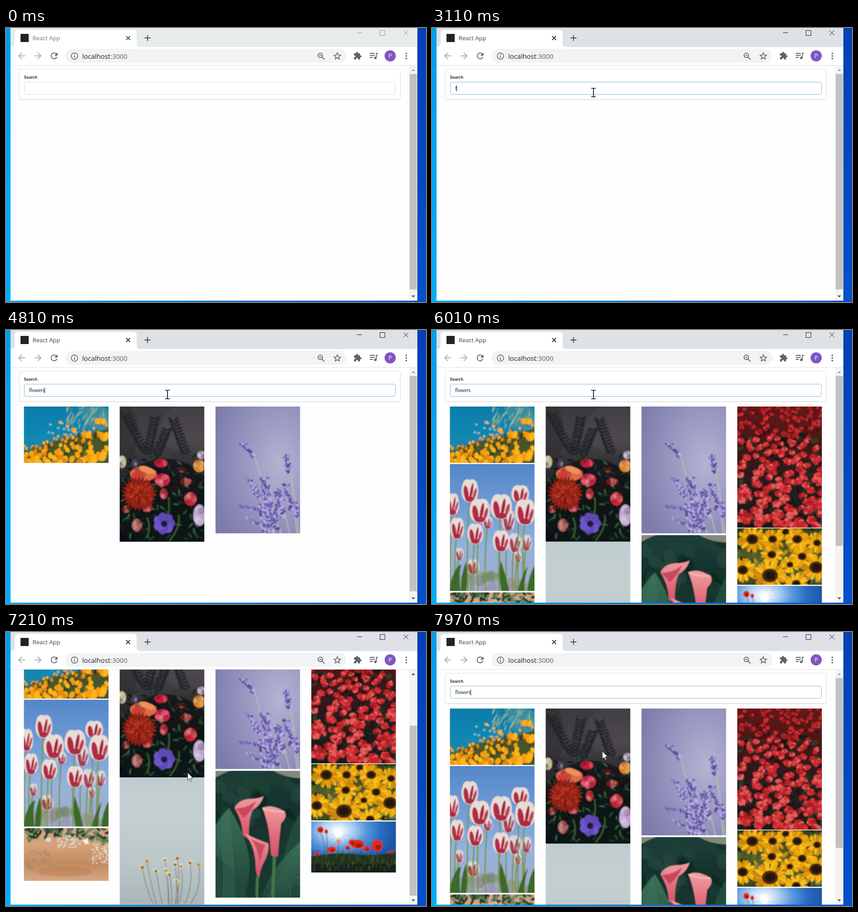
Write an HTML page that moves like this. It is 926x605 px and loops after 8 s.

```html
<!DOCTYPE html>
<html lang="en">
<head>
<meta charset="utf-8">
<title>React App</title>
<style>
html, body { margin: 0; width: 100%; height: 100%; overflow: hidden; background: #fff; }
svg { display: block; }
.ui { font-family: "Open Sans", "Noto Sans", sans-serif; }
.page { font-family: Lato, sans-serif; }
.line { fill: none; stroke: #5f6368; stroke-width: 1.8; }
</style>
</head>
<body>
<svg id="stage" width="926" height="605" viewBox="0 0 926 605" xmlns="http://www.w3.org/2000/svg">
<defs>
  <clipPath id="view"><rect x="10" y="83" width="879" height="519"/></clipPath>
  <filter id="soft"><feGaussianBlur stdDeviation=".8"/></filter>
  <linearGradient id="left" x2="0" y2="1"><stop stop-color="#009dec"/><stop offset="1" stop-color="#00aef8"/></linearGradient>
  <linearGradient id="right" x2="0" y2="1"><stop stop-color="#0440b4"/><stop offset="1" stop-color="#0650cc"/></linearGradient>
  <linearGradient id="foot"><stop stop-color="#00a3ee"/><stop offset=".5" stop-color="#0a78cd"/><stop offset="1" stop-color="#0650c8"/></linearGradient>
</defs>
<rect width="926" height="605" fill="url(#foot)"/>
<rect width="10" height="605" fill="url(#left)"/>
<rect x="907" width="19" height="605" fill="url(#right)"/>
<rect x="907" width="1" height="603" fill="#03379b"/>
<rect x="10" width="897" height="602" fill="#fefefe"/>

<g class="page" clip-path="url(#view)">
  <g id="doc">
    <rect x="29.5" y="92" width="840" height="67" rx="3" fill="#dcddde"/>
    <rect x="29.5" y="91" width="840" height="67" rx="3" fill="#fff" stroke="#dcddde"/>
    <text x="39.5" y="111.7" font-size="9.9" font-weight="700" fill="#222">Search</text>
    <rect id="field" x="40.5" y="119.5" width="818" height="27" rx="3" fill="#fff"/>
    <text id="query" x="51" y="137" font-size="10.5" fill="#222"></text>
    <rect id="caret" y="127" width="1" height="13" fill="#111"/>
    <g id="photos"></g>
  </g>
</g>

<g id="scrollbar">
  <rect x="889" y="83" width="18" height="519" fill="#f3f3f2"/>
  <rect id="thumb" x="890" width="16" fill="#c1c1c1"/>
  <path id="up" d="M894 95L898 90.500L902 95Z"/>
  <path id="down" d="M894 590.500H902L898 595Z" fill="#505050"/>
</g>

<g class="ui">
  <rect id="bar" x="10" width="897" height="42"/>
  <path d="M11 42Q19 42 19 34V12Q19 4 27 4H280Q288 4 288 12V34Q288 42 296 42Z" fill="#fff"/>
  <rect x="32" y="13" width="18" height="18" fill="#20232a"/>
  <text id="tab" x="58.500" y="27" font-size="13">React App</text>
  <path id="closeTab" class="line" d="M265 18L273.500 26.500M273.500 18L265 26.500"/>
  <path class="line" style="stroke:#45494d" d="M305.500 22H318.500M312 15.500V28.500"/>
  <path id="controls" fill="none" d="M774 10.500H785M824.500 5.500H835.500V16.500H824.500ZM876.500 5.500L887 16M887 5.500L876.500 16"/>
  <rect x="10" y="42" width="897" height="40" fill="#fff"/>
  <rect x="10" y="82" width="897" height="1" fill="#dfe0e1"/>
  <g class="line" style="stroke:#acaeb1">
    <path d="M42 61.500H28.500M35 54.500L28 61.500L35 68.500"/>
    <path d="M63 61.500H76.500M70 54.500L77 61.500L70 68.500"/>
  </g>
  <path class="line" d="M111.500 58A6.500 6.500 0 1 0 112.300 63.500"/>
  <path d="M113.500 54V61H106.500Z" fill="#5f6368"/>
  <rect x="131" y="46" width="619" height="31" rx="15.500" fill="#f1f3f4"/>
  <circle class="line" style="stroke-width:1.600" cx="151" cy="62" r="7"/>
  <path class="line" d="M151 61V66M151 57.500V59.300"/>
  <text x="168" y="67.500" font-size="14.8" fill="#202124">localhost<tspan fill="#5f6368">:3000</tspan></text>
  <circle class="line" cx="693" cy="60.300" r="5"/>
  <path class="line" d="M696.500 64L702 69.500M690.500 60.300H695.500"/>
  <path id="star" class="line" style="stroke-width:1.600"/>
  <path transform="translate(765.500 51.800) scale(.8)" fill="#5f6368" d="M20.500 11H19V7c0-1.100-.9-2-2-2h-4V3.500a2.500 2.500 0 0 0-5 0V5H4c-1.100 0-2 .9-2 2v3.800h1.500a2.700 2.700 0 0 1 0 5.400H2V20c0 1.100.9 2 2 2h3.800v-1.500a2.700 2.700 0 0 1 5.400 0V22H17c1.100 0 2-.9 2-2v-4h1.500a2.500 2.500 0 0 0 0-5z"/>
  <path class="line" d="M802 56H813M802 60.500H813M802 65H809M816.500 66V56H820"/>
  <circle cx="814.300" cy="66" r="2.700" fill="#5f6368"/>
  <circle cx="847" cy="61.500" r="12.300" fill="#7e57c2"/>
  <text x="847" y="66" font-size="12.500" fill="#fff" text-anchor="middle">P</text>
  <g fill="#5f6368"><circle cx="882.500" cy="56" r="1.800"/><circle cx="882.500" cy="61.700" r="1.800"/><circle cx="882.500" cy="67.400" r="1.800"/></g>
</g>

<path id="arrow" d="M.5 .5V17L4.300 13.500L7 19.500L9.500 18.400L7 12.500H12.300Z" fill="#fff" stroke="#222" stroke-width=".9"/>
<g id="beam" fill="none">
  <path d="M-5 -9H-2Q0 -9 0 -7Q0 -9 2 -9H5M0 -8V9M-5 10H-2Q0 10 0 8Q0 10 2 10H5" stroke="#fff" stroke-width="3"/>
  <path d="M-5 -9H-2Q0 -9 0 -7Q0 -9 2 -9H5M0 -8V9M-5 10H-2Q0 10 0 8Q0 10 2 10H5" stroke="#111" stroke-width="1.700"/>
</g>
</svg>

<script>
const $ = id => document.getElementById(id);
const set = (id, attrs) => { for (const k in attrs) $(id).setAttribute(k, attrs[k]); };
const show = (id, on) => set(id, { visibility: on ? 'visible' : 'hidden' });

// ---- drawing helpers ----
const W = 186.5;
let seed = 1;
const rnd = (a = 0, b = 1) => {
  seed = (seed * 16807) % 2147483647;
  return a + (b - a) * seed / 2147483647;
};
const pick = list => list[Math.floor(rnd() * list.length)];
const n1 = v => +v.toFixed(1);
const many = (n, fn) => Array.from({ length: n }, (_, i) => fn(i / n)).join('');
const oval = (x, y, rx, ry, fill, turn = 0, op = 1) =>
  `<ellipse rx="${n1(rx)}" ry="${n1(ry)}" fill="${fill}" opacity="${op}" transform="translate(${n1(x)} ${n1(y)}) rotate(${n1(turn)})"/>`;
const shape = (d, fill) => `<path d="${d}" fill="${fill}"/>`;
const stem = (d, color, w) => `<path d="${d}" fill="none" stroke="${color}" stroke-width="${w}"/>`;
const spokes = (x, y, r, inner, n, turn = 0) => 'M' + Array.from({ length: n * 2 }, (_, i) => {
  const a = Math.PI * i / n + turn, q = i % 2 ? inner : r;
  return n1(x + q * Math.sin(a)) + ' ' + n1(y - q * Math.cos(a));
}).join('L') + 'Z';
let grads = 0;
const gradient = (colors, radial = '') => {
  const id = 'g' + grads++, tag = radial ? 'radialGradient' : 'linearGradient';
  const stops = colors.map((c, i) => `<stop offset="${i / (colors.length - 1)}" stop-color="${c}"/>`).join('');
  return [`<${tag} id="${id}" ${radial || 'x2="0" y2="1"'}>${stops}</${tag}>`, `url(#${id})`];
};
const back = (h, colors, radial) => {
  const [def, url] = gradient(colors, radial);
  return `${def}<rect x="-5" y="-5" width="${W + 10}" height="${h + 10}" fill="${url}"/>`;
};

// ---- pictures ----
const meadow = h => {
  const top = x => 88 - x * .3;
  return back(h, ['#0a7ba8', '#1188b3', '#2c7f92']) +
    oval(165, 25, 55, 26, '#5f9ba2', 40, .5) +
    many(45, () => { const x = rnd(95, 190), y = rnd(0, 45); return oval(x, y, 1.3, rnd(5, 13), pick(['#9db77f', '#6f9a78', '#b9c8a8']), rnd(10, 45), .7); }) +
    shape(`M-5 105Q30 86 70 76T192 48V130H-5Z`, '#47562a') +
    many(14, () => oval(rnd(50, 125), rnd(35, 75), 3, 2.5, '#b9d2cf', 0, .7)) +
    many(95, p => {
      const x = rnd(0, W), t = top(x), y = t + (h + 3 - t) * p, r = 3 + p * 6;
      return oval(x + rnd(-9, 9), y + r, 2, r * 1.3, pick(['#39451d', '#2b331a', '#5d6b2f']), rnd(-30, 30)) +
        oval(x, y, r * .75, r, pick(['#f9a511', '#fdb515', '#e48508', '#f39a0c']), rnd(-40, 40));
    }) +
    [[80, 35, 4], [163, 32, 8], [173, 33, 8], [96, 44, 4], [110, 52, 6], [140, 62, 10], [177, 66, 12], [150, 116, 14], [25, 116, 11], [170, 110, 13]]
      .map(([x, y, r]) => oval(x - r * .35, y, r * .55, r * .85, '#f59d0b', -15) + oval(x + r * .35, y, r * .55, r * .85, '#fdb51a', 15)).join('');
};

const tulips = h => {
  const egg = (x, y, rx, ry) => `M${x - rx * .75} ${y - ry * .8}C${x - rx * 1.3} ${y} ${x - rx} ${y + ry} ${x} ${y + ry}S${x + rx * 1.3} ${y} ${x + rx * .75} ${y - ry * .8}Q${x + rx * .3} ${y - ry * 1.1} ${x} ${y - ry * .9}Q${x - rx * .4} ${y - ry * 1.1} ${x - rx * .75} ${y - ry * .8}Z`;
  const cup = ([x, y, rx, ry]) => shape(egg(x, y, rx, ry), '#e8dcd7') +
    oval(x - rx * .45, y + ry * .2, rx * .3, ry * .65, '#b22a45', -8) + oval(x + rx * .2, y + ry * .05, rx * .17, ry * .7, '#a8203b', 10) +
    oval(x + rx * .6, y + ry * .25, rx * .18, ry * .5, '#be4158', 16) + oval(x, y + ry * .72, rx * .55, ry * .24, '#ad2b44');
  const far = [[21, 199, 9, 14], [51, 227, 14, 17], [143, 174, 14, 22], [169, 174, 11, 18], [83, 129, 11, 14], [129, 124, 14, 24], [150, 205, 8, 13]];
  const near = [[44, 59, 18, 26], [155, 66, 19, 20], [166, 106, 22, 29], [6, 89, 14, 25], [16, 142, 15, 24], [66, 103, 22, 27], [113, 94, 23, 28], [56, 154, 17, 23], [113, 170, 18, 24]];
  const stalk = ([x, y]) => stem(`M${x} ${y}Q${x - 8} ${(y + h) / 2} ${x - 4} ${h + 3}`, '#7c963f', 3);
  return back(h, ['#5286c8', '#6f9bd5', '#94b3dd', '#a4a9c8']) +
    many(24, () => oval(rnd(0, W), rnd(245, 285), 10, 12, pick(['#8a9673', '#a58bab', '#6e8560', '#9a98b4']), 0, .6)) +
    far.map(stalk).join('') + `<g opacity=".85">${far.map(cup).join('')}</g>` + near.map(stalk).join('') +
    shape('M-3 285Q8 225 25 222Q18 250 24 285ZM24 285Q24 240 36 215Q40 250 36 285ZM114 285Q106 240 112 212Q124 250 132 285ZM148 285Q160 240 172 225Q162 260 164 285ZM170 285Q174 240 190 220V285Z', '#3b6a2a') +
    near.map(cup).join('');
};

const wood = h => back(h, ['#d0a684', '#d6a27a', '#c48a61', '#d8ab8a']) +
  [26, 58, 90].map(y => stem(`M0 ${y}H187`, '#b98d6a', .8)).join('') + oval(90, 96, 60, 11, '#b5703f', 0, .35) +
  many(90, () => { const x = rnd(0, W); return oval(x, rnd(0, 16 + 16 * Math.abs(x - 70) / 100), 7, 3, pick(['#2c4630', '#496a49', '#1f3827', '#6d8a64']), rnd(0, 180)); }) +
  many(22, () => oval(rnd(8, 62), rnd(48, 94), 6, 1.5, '#8f8d66', rnd(20, 80), .7)) +
  many(75, () => oval(rnd(148, 186), rnd(35, 78), 1.8, 1.5, pick(['#e9e4d5', '#cfcdb4']))) +
  many(50, () => oval(rnd(72, 125), rnd(16, 44), 1.8, 1.5, '#dfe3da')) +
  oval(54, 26, 6, 5, '#cfdcd9') + oval(136, 30, 8, 3, '#f1f1ea', 30) + oval(138, 29, 3, 7, '#f1f1ea', 20);

const bouquet = h => {
  const sprig = (x, y, dx, dy) => stem(`M${x} ${y}l${dx} ${dy}`, '#232629', 1) +
    many(12, p => [-1, 1].map(s => oval(x + dx * p + s * 6, y + dy * p, 7, 2.6, '#212527', s * rnd(-50, -15), .9)).join(''));
  const blooms = [
    [91, 125, 16, 10, '#c51f3d'], [52, 149, 32, 17, '#df6a45'], [94, 162, 18, 15, '#d62c48'], [60, 222, 13, 12, '#b92230'],
    [97, 193, 9, 13, '#b8323a'], [147, 166, 14, 9, '#841d19'], [156, 204, 15, 16, '#cc2c36'], [175, 131, 14, 15, '#d68427'],
    [180, 107, 10, 10, '#a9a3bd'], [5, 122, 10, 15, '#bdb894'], [38, 262, 12, 16, '#96403a'], [14, 227, 9, 9, '#8a211e'],
    [176, 240, 15, 26, '#b9a2ce'], [137, 140, 9, 7, '#5c1d1d'], [32, 125, 7, 9, '#4a4668']];
  const bloom = ([x, y, rx, ry, c]) => oval(x, y, rx * .92, ry * .92, c) +
    many(7, p => oval(x + rx * .5 * Math.cos(p * 6.3), y + ry * .5 * Math.sin(p * 6.3), rx * .5, ry * .35, pick(['#fff', '#400a14', c]), rnd(0, 180), .22));
  return back(h, ['#3b383e', '#474348', '#2a292d', '#101315', '#0d1113']) +
    oval(150, 50, 60, 55, '#59545a', 0, .25) + oval(0, 60, 40, 80, '#29292d', 0, .5) +
    sprig(12, 18, 45, 85) + sprig(78, 25, -18, 85) + sprig(118, 28, 28, 80) + sprig(105, 50, -28, 70) +
    oval(100, 220, 110, 105, '#0f1416', 0, .8) +
    many(130, () => oval(rnd(0, W), rnd(108, 292), 7, 2, pick(['#1c3526', '#274a31', '#162720', '#3c5c40', '#0c1012']), rnd(0, 180))) +
    stem('M60 290Q70 265 60 245M110 296Q135 265 130 240M108 200Q112 240 100 250', '#33572a', 4) +
    blooms.map(bloom).join('') + oval(60, 140, 18, 7, '#ef8f5c', 20) + oval(38, 152, 12, 8, '#d33a39') +
    shape(spokes(43, 192, 39, 30, 26), '#8f2218') + many(90, () => {
      const a = rnd(0, 6.3), r = rnd(5, 33);
      return oval(43 + r * Math.cos(a), 190 + r * .75 * Math.sin(a), 5, 1.1, pick(['#c93e24', '#74180f', '#b5301c']), a * 57.3);
    }) +
    many(7, p => oval(98 + 11 * Math.cos(p * 6.3), 258 + 11 * Math.sin(p * 6.3), 13, 11, pick(['#6d55c9', '#7f68d6', '#6049b4']), p * 360)) +
    oval(98, 259, 7, 7, '#1e1a38');
};

const daisies = h => {
  const heads = [[60, 184], [80, 206], [100, 182], [127, 178], [135, 196], [155, 188], [174, 192], [110, 214], [125, 229], [50, 198], [102, 205], [122, 192]];
  return back(h, ['#c0cdd0', '#c4cfd0', '#bac6c8', '#a9b5b8']) +
    heads.map(([x, y]) => stem(`M${x} ${y}Q${x + 8} ${y + 50} ${n1(x * .65 + 42)} ${h}`, '#756a55', 1.2)).join('') +
    heads.map(([x, y], i) => oval(x, y, 7, 4.5, i % 3 ? '#e6d9b8' : '#d7c7a0', i * 25) + oval(x, y + 1, 3.2, 3.2, i % 2 ? '#8a6a35' : '#b38c3d')).join('');
};

const lavender = h => {
  const spike = (x, y, dx, dy, w, n) => many(n * 2, p => {
    const side = rnd(-1, 1), a = x + dx * p + side * w, b = y + dy * p + rnd(-2, 2);
    return oval(a, b, 4, 2, pick(['#6a5cae', '#7d70bd', '#a79edb', '#54468f', '#b9b1e2']), side > 0 ? -50 : 50);
  });
  return back(h, ['#b3b4d2', '#9797c0', '#7c7bab'], 'cx=".75" cy=".45" r=".8"') +
    stem('M87 112Q98 150 108 190M165 147Q176 200 184 283M130 240L146 283M96 255L112 283M150 225L164 283M172 210L180 283M122 180L128 283', '#b5c0a9', 2.2) +
    spike(60, 82, 27, 32, 5, 18) + spike(157, 108, 4, 38, 7, 22) + spike(76, 160, 20, 45, 7, 26) +
    spike(154, 172, 16, 55, 7, 24) + spike(108, 156, 8, 70, 9, 48) + spike(140, 186, 4, 60, 9, 34) +
    spike(58, 220, 40, 8, 5, 20) + spike(72, 244, 22, 16, 5, 13) + spike(112, 215, 10, 62, 18, 60) + spike(176, 215, 4, 30, 5, 14);
};

const calla = h => {
  const [def, pink] = gradient(['#f0a0a2', '#e2707e', '#cf5269']);
  const [leafDef, leaf] = gradient(['#3a6f58', '#2c5947', '#1e4236']);
  return back(h, ['#1f4039', '#12302b', '#163a30', '#15372d']) + def + leafDef +
    many(26, () => oval(rnd(0, W), rnd(5, 125), 17, 13, pick(['#2b5144', '#0b241f', '#1f4539']), rnd(0, 90), .5)) +
    shape('M-5 -5H48Q20 2 -5 18ZM120 -5H190V16Q150 16 120 -5Z', '#85897b') +
    shape('M30 82Q48 110 62 146Q88 210 62 285H-5V130Q14 95 30 82Z', leaf) +
    shape('M190 88Q160 130 150 200Q140 240 142 285H190Z', '#234b3d') +
    shape('M190 155Q130 200 98 285H190Z', leaf) + shape('M-5 185Q40 210 72 285H-5Z', '#20483a') +
    many(7, p => stem(`M${n1(26 - p * 26)} ${n1(90 + p * 60)}Q${n1(42 - p * 20)} 190 ${n1(42 - p * 30)} 285M187 ${n1(165 + p * 100)}Q${n1(145 + p * 20)} 230 ${n1(112 + p * 60)} 285`, '#568a70', .7)) +
    shape('M42 82Q50 64 76 62Q94 62 106 56Q100 76 82 86Q72 108 74 152L60 142Q60 112 42 82Z', pink) +
    shape('M44 83Q68 84 90 66Q78 92 62 104Z', '#c9475e') +
    shape('M103 82Q125 72 152 90Q160 100 145 116Q140 150 138 186Q130 198 122 184Q120 120 103 82Z', pink) +
    stem('M104 82Q126 92 152 90', '#f6bdbb', 3) + stem('M130 188Q128 230 126 283', '#47754a', 7) +
    shape('M64 138Q92 152 116 160Q120 172 110 196Q98 216 96 238Q88 230 88 200Q84 160 64 138Z', pink) +
    shape('M78 150Q96 160 110 164Q102 180 98 205Q94 172 78 150Z', '#c94d62') + stem('M93 232Q90 260 92 283', '#47754a', 6);
};

const begonias = h => {
  const head = (x, y, r) => many(5, p => oval(x + r * .6 * Math.cos(p * 6.3 + x), y + r * .45 * Math.sin(p * 6.3 + x), r * .6, r * .45,
    pick(y < 70 ? ['#a31a20', '#bb2529', '#8a151b', '#cc3034'] : ['#c3262c', '#d93a3c', '#aa1d25', '#e4605e']), rnd(0, 180)));
  return back(h, ['#6a1216', '#451619', '#231b1b', '#171b18']) +
    many(70, () => oval(rnd(0, W), rnd(50, h), 8, 5, pick(['#1d3024', '#2a3d2b', '#0f1614']), rnd(0, 180))) +
    many(230, p => {
      const r = 4 + p * 6;
      return head(rnd(-3, W + 3), h * p ** 1.15, r) + oval(rnd(0, W), h * p ** 1.15 + 6, r * .8, r * .4, pick(['#1b2a20', '#2a1114']), rnd(0, 180), .85);
    });
};

const sunflowers = h => {
  const petals = (x, y, r, n) => many(n, p => {
    const a = p * 360 + rnd(-12, 12), q = r * rnd(.6, .75), t = a * Math.PI / 180;
    return oval(x + q * Math.cos(t), y + q * Math.sin(t) * .9, r * .4, r * .13, pick(['#f0ac0e', '#e29a08', '#f8c01c', '#cb860a']), a);
  });
  return back(h, ['#333a16', '#4d5c2c', '#3b4a20']) +
    many(90, () => oval(rnd(0, W), rnd(0, h), 9, 4, pick(['#34441b', '#6b7f47', '#22260f', '#55692f', '#c48a0d']), rnd(0, 180))) +
    [[107, 8, 18, 8], [33, 24, 29, 12], [78, 24, 22, 9], [132, 24, 24, 10], [176, 32, 23, 8], [76, 58, 23, 9], [12, 92, 27, 11], [143, 62, 25, 9], [116, 80, 20, 7], [174, 86, 30, 14], [72, 104, 34, 16], [130, 122, 24, 9]]
      .map(([x, y, r, c]) => petals(x, y, r, 30) + oval(x, y, c * 1.1, c * .95, '#4a2c0e') + oval(x, y, c * .7, c * .6, '#20160c')).join('');
};

const field = h => back(h, ['#ffffff', '#b5d4f3', '#5a98dc', '#2a6dc2', '#1d57a9'], 'cx=".32" cy=".2" r=".65"') +
  shape(spokes(60, 26, 26, 7, 12), '#ffffff90') + oval(60, 26, 9, 9, '#fff') +
  shape(`M-5 78Q50 66 100 72T192 64V${h + 5}H-5Z`, '#24361b') + shape(`M-5 94H192V${h + 5}H-5Z`, '#17231a') +
  many(150, () => stem(`M${n1(rnd(0, W))} ${n1(rnd(70, 110))}l${n1(rnd(-3, 3))} -9`, pick(['#4c6a2c', '#2c4020', '#5f7a3a', '#433a5c', '#17221a']), 1)) +
  stem('M20 22Q32 50 30 80M34 25Q36 50 34 80M60 46V75M100 58V85M146 60V90', '#4a5f2a', 1.2) +
  [[20, 18, 7, 7], [33, 22, 4, 5], [45, 62, 10, 7], [102, 50, 15, 10], [90, 46, 8, 7], [145, 53, 12, 13], [122, 60, 8, 6], [80, 58, 6, 5], [12, 72, 6, 4], [175, 68, 7, 3]]
    .map(([x, y, rx, ry]) => oval(x, y, rx, ry, '#df2a16') + oval(x + rx * .2, y + ry * .3, rx * .5, ry * .4, '#9c160d')).join('') + oval(60, 44, 5, 5, '#e98a83');

// drawing, column, top, height, time of appearance
const wall = [
  [meadow, 0, 169, 124.5, 4810], [bouquet, 1, 169, 298.5, 4810], [lavender, 2, 169, 280, 4810],
  [begonias, 3, 169, 267.5, 4900], [tulips, 0, 296, 280, 4900], [daisies, 1, 467.5, 280.5, 4900],
  [calla, 2, 453, 280, 4900], [sunflowers, 3, 438, 124.5, 4900], [wood, 0, 579.5, 116.5, 5000], [field, 3, 565, 112.5, 5000]
];
$('photos').innerHTML = wall.map(([draw, col, y, h], i) => {
  seed = 77 + i * 991;
  return `<svg id="photo${i}" x="${39.5 + col * 211.2}" y="${y}" width="${W}" height="${h}" overflow="hidden"><g filter="url(#soft)">${draw(h)}</g></svg>`;
}).join('');
set('star', { d: spokes(730.5, 62.3, 7.6, 3.4, 5) });

// ---- timeline ----
const lerp = (a, b, p) => a + (b - a) * p;
const mix = (a, b, p) => `rgb(${a.map((v, i) => Math.round(lerp(v, b[i], p)))})`;
const ease = p => p * p * (3 - 2 * p);
// stepped progress: first step at a, the nth at b
const steps = (t, a, b, n) => t < a ? 0 : Math.min(n, 1 + Math.floor((t - a) / (b - a) * (n - 1) + .001)) / n;
// value of the last [time, value] pair already reached
const latest = (t, keys) => keys.reduce((v, k) => t >= k[0] ? k[1] : v, keys[0][1]);

const typed = [[0, 0], [3110, 1], [3270, 2], [3450, 3], [3660, 4], [3960, 5], [4160, 6], [4460, 7]];
const caretX = [51, 54, 57.5, 63, 71, 76, 80, 85];
const scrolls = [[0, 0], [6470, 9], [6570, 65], [6670, 149], [7210, 146.5], [7310, 108], [7420, 51.5], [7520, 0]];
const blinks = [[0, 0], [2330, 1], [2810, 0], [3110, 1], [4970, 0], [5490, 1], [6010, 0], [6520, 1], [7030, 0], [7520, 1]];

function pointer(t) {
  if (t < 1370) {
    const p = Math.max(0, (steps(t, 530, 1090, 7) * 7 - 1) / 6), q = 1 - p;
    return [q * q * 706 + 2 * p * q * 345 + p * p * 418, q * q * 580 + 2 * p * q * 260 + p * p * 172];
  }
  if (t < 6190) {
    const p = ease(steps(t, 1370, 2010, 8));
    return [lerp(418, 356, p), lerp(172, 142, p)];
  }
  return latest(t, [[6190, [386, 246]], [6290, [400, 310]], [7970, [375, 263]]]);
}

function render(t) {
  const on = steps(t, 2220, 2440, 3), count = latest(t, typed), scroll = latest(t, scrolls);
  set('bar', { fill: mix([230, 236, 235], [222, 225, 230], on) });
  set('tab', { fill: mix([112, 117, 121], [60, 64, 67], on) });
  $('closeTab').style.stroke = mix([75, 79, 83], [48, 51, 54], on);
  set('controls', { stroke: mix([145, 149, 149], [25, 25, 28], on) });
  set('field', { stroke: mix([222, 222, 223], [133, 183, 217], on) });
  $('query').textContent = 'flowers'.slice(0, count);
  set('caret', { x: caretX[count] });
  show('caret', latest(t, blinks));
  wall.forEach((w, i) => show('photo' + i, t >= w[4]));

  set('doc', { transform: `translate(0 ${-scroll})` });
  set('thumb', { y: 101.5 + scroll * .72, height: t < 4900 ? 475.5 : 375 });
  set('up', { fill: scroll ? '#505050' : '#a3a3a3' });

  const [x, y] = pointer(t), text = t < 6190 && y < 147;
  set('arrow', { transform: `translate(${x} ${y})` });
  set('beam', { transform: `translate(${x} ${y})` });
  show('arrow', t >= 530 && !text);
  show('beam', text);
}

function frame() {
  render(performance.now() % 8000);
  requestAnimationFrame(frame);
}
frame();
</script>
</body>
</html>
```
